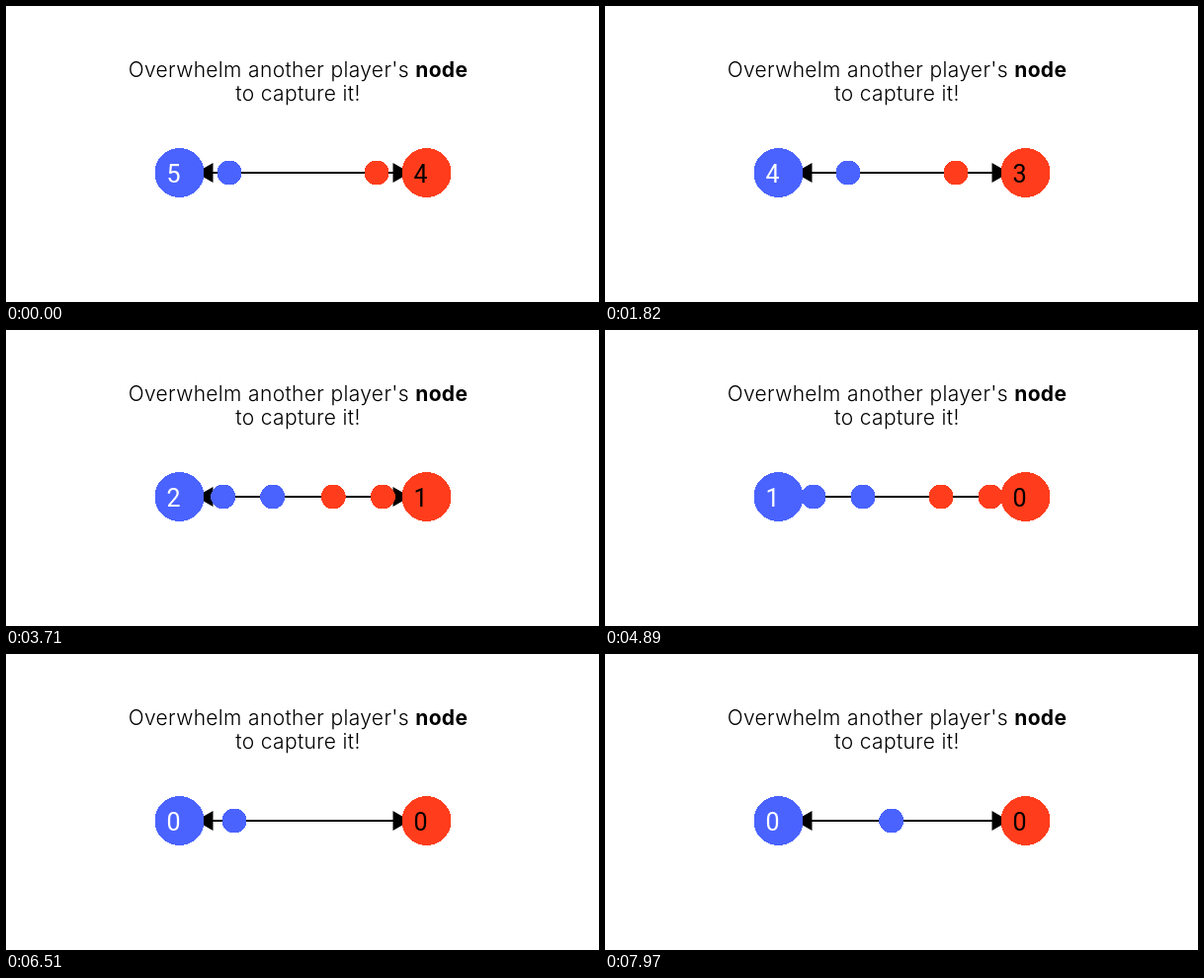
An HTML page for the animation above (8000 ms loop, 600 by 300 pixels).

```html
<!DOCTYPE html>
<html lang="en">
<head>
<meta charset="utf-8">
<title>Capture a node</title>
<style>
  html, body { margin: 0; width: 100%; height: 100%; overflow: hidden; background: #fff; }
  svg { display: block; }
  circle { shape-rendering: crispEdges; }
  .title { font: 300 21px Inter, sans-serif; letter-spacing: 0.35px; }
  .title .bold { font-weight: 700; }
  .count { font: 25px Roboto, Arial, sans-serif; }
  .blue { fill: #4a63ff; }
  .red { fill: #ff3d1c; }
</style>
</head>
<body>
<svg width="600" height="300" viewBox="0 0 600 300">
  <g class="title">
    <text x="295.5" y="72" text-anchor="middle">Overwhelm another player's <tspan class="bold">node</tspan></text>
    <text x="295.5" y="96" text-anchor="middle">to capture it!</text>
  </g>
  <path d="M200 169H401" stroke="#000" stroke-width="2"/>
  <path d="M192 169L209.5 159V179ZM409 169L391.5 159V179Z"/>
  <g id="balls"></g>
  <circle class="blue" cx="175.5" cy="169" r="25"/>
  <circle class="red" cx="425.5" cy="169" r="25"/>
  <text class="count" id="blueCount" x="162.5" y="179" fill="#fff"></text>
  <text class="count" id="redCount" x="412.5" y="179"></text>
</svg>
<script>
const LOOP = 8000;
const STEP = 1.25;          // pixels a ball travels per tick
const SPAWN_EVERY = 40;     // ticks between two balls of a node
const FIRST_SPAWN = 20;
const SPAWN_OFFSET = 25.5;  // distance from the node's centre at birth
const CLASH_OFFSET = 100;   // opposing balls destroy each other here

// The tick rate varies: [first tick ms, last tick ms, ticks]
const PHASES = [
  [20, 810, 22], [830, 1610, 28], [1640, 2430, 25], [2460, 3240, 25],
  [3270, 4050, 25], [4080, 4870, 22], [4890, 5670, 28], [5700, 6480, 28],
  [6510, 7290, 25], [7320, 7970, 23]
];

const players = [
  { name: 'blue', x: 175.5, dir: 1, units: 5 },
  { name: 'red', x: 425.5, dir: -1, units: 4 }
];
const sharedUnits = Math.min(...players.map(p => p.units));
const layer = document.getElementById('balls');

for (const player of players) {
  player.label = document.getElementById(player.name + 'Count');
  player.balls = [];
  // Ball -1 is already on its way when the loop begins.
  for (let i = -1; i < player.units; i++) {
    const circle = document.createElementNS('http://www.w3.org/2000/svg', 'circle');
    circle.setAttribute('class', player.name);
    circle.setAttribute('cy', 169);
    circle.setAttribute('r', 12.5);
    layer.append(circle);
    player.balls.push({ circle, birth: FIRST_SPAWN + i * SPAWN_EVERY, rival: i < sharedUnits });
  }
}

function tickAt(time) {
  let tick = 0;
  for (const [start, end, count] of PHASES) {
    if (time < start) break;
    const progress = Math.min(1, (time - start) / (end - start));
    tick += 1 + Math.round(progress * (count - 1));
  }
  return tick;
}

function draw(tick) {
  for (const { x, dir, units, label, balls } of players) {
    const spawned = balls.filter(ball => tick >= ball.birth).length - 1;
    label.textContent = units - spawned;
    for (const { circle, birth, rival } of balls) {
      const offset = SPAWN_OFFSET + (tick - birth) * STEP;
      const alive = tick >= birth && !(rival && offset >= CLASH_OFFSET);
      circle.setAttribute('visibility', alive ? 'visible' : 'hidden');
      circle.setAttribute('cx', x + dir * offset);
    }
  }
}

const began = performance.now();
function frame() {
  draw(tickAt((performance.now() - began) % LOOP));
  requestAnimationFrame(frame);
}
frame();
</script>
</body>
</html>
```
